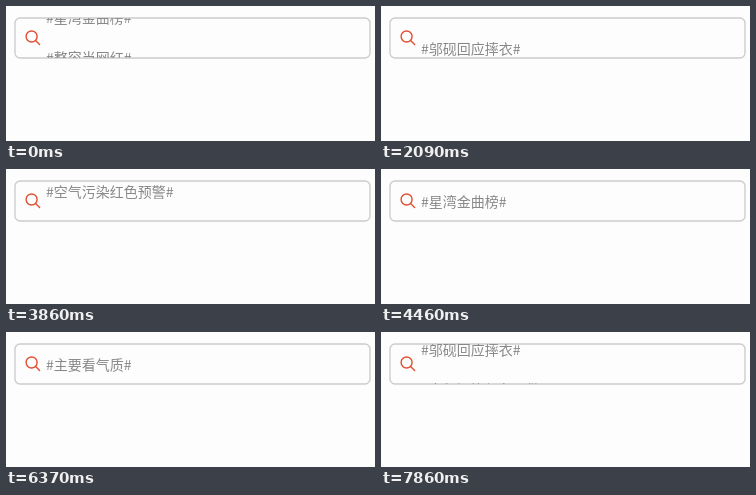
An HTML page that plays this animation: 369 by 135 pixels, repeating every 8 s.

```html
<!DOCTYPE html>
<html lang="zh-CN">
<head>
<meta charset="utf-8">
<title>Search box with rolling topics</title>
<style>
  html, body { margin: 0; width: 100%; height: 100%; overflow: hidden; background: #fdfdfd; }
  svg { position: absolute; left: 0; top: 0; fill: none; }
  .box { stroke: #cdcdcd; stroke-width: 1.4; }
  .icon { stroke: #e24e30; stroke-width: 1.4; stroke-linecap: round; }
  .view { position: absolute; left: 40px; top: 12px; width: 300px; height: 40px; overflow: hidden; }
  .row {
    position: absolute; left: 0; top: 0; height: 40px;
    font: 14px/40px "Noto Sans CJK SC", "Noto Sans CJK", sans-serif;
    color: #888; white-space: nowrap;
  }
</style>
</head>
<body>
<svg width="369" height="135">
  <rect class="box" x="9" y="12" width="355" height="40" rx="5"/>
  <g class="icon">
    <circle cx="25.6" cy="30.5" r="5.5"/>
    <path d="M29.6 34.5 L33.6 38.4"/>
  </g>
</svg>
<div class="view"><div class="row"></div><div class="row"></div></div>
<script>
  const LOOP = 8000, TICK = 148.1, ROW = 40, ROLL = 690;
  const topics = ['星湾金曲榜', '整容当网红', '主要看气质', '邬砚回应摔衣', '空气污染红色预警'];
  const starts = [-207, 750, 1755, 2712, 3725, 4680, 5675, 6695, 7690];
  const [oldRow, newRow] = document.querySelectorAll('.row');

  const bezier = (a, b, u) => 3 * a * u * (1 - u) ** 2 + 3 * b * u * u * (1 - u) + u ** 3;

  // cubic-bezier(.25, .1, .25, 1)
  function ease(x) {
    if (x >= 1) return 1;
    let lo = 0, hi = 1;
    for (let i = 0; i < 24; i++) {
      const mid = (lo + hi) / 2;
      if (bezier(0.25, 0.25, mid) < x) lo = mid; else hi = mid;
    }
    return bezier(0.1, 1, lo);
  }

  function place(row, index, y) {
    const text = `#${topics[index % topics.length]}#`;
    if (row.textContent !== text) row.textContent = text;
    row.style.transform = `translateY(${y.toFixed(2)}px)`;
  }

  function draw(now) {
    // the roll advances in coarse ticks
    const t = Math.floor((now % LOOP) / TICK) * TICK;
    const n = starts.filter(s => s <= t).length - 1;
    const p = ease((t - starts[n]) / ROLL);
    place(oldRow, n, -ROW * p);
    place(newRow, n + 1, ROW * (1 - p));
  }

  const begin = performance.now();
  function loop() {
    draw(performance.now() - begin);
    requestAnimationFrame(loop);
  }
  loop();
</script>
</body>
</html>
```
